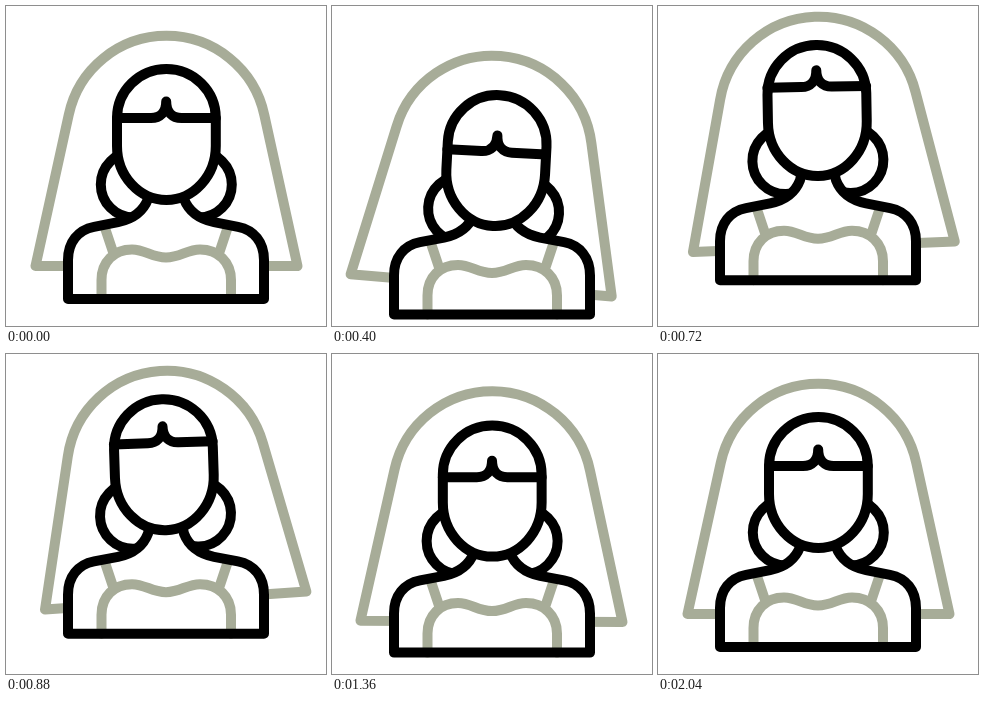
An HTML page with a canvas for the animation above (2300 ms loop, 320 by 320 pixels).

```html
<!DOCTYPE html>
<html lang="en">
<head>
<meta charset="utf-8">
<title>Bride</title>
<style>
html, body { margin: 0; width: 100%; height: 100%; overflow: hidden; background: #fff; }
canvas { display: block; width: 100vw; height: 100vh; }
</style>
</head>
<body>
<canvas id="stage"></canvas>
<script>
const SIZE = 320, LOOP = 2300, STEP = 40, END = 2040, MID = 160.3;
const INK = '#000', SAGE = '#a7ac98';
const canvas = document.getElementById('stage');
const ctx = canvas.getContext('2d');
const scale = Math.max(1, window.devicePixelRatio || 1);
canvas.width = canvas.height = SIZE * scale;

// Swings from rest through the given peaks, one per beat, with sine easing.
function swing(t, beats, peaks) {
  let from = 0, start = 0;
  for (let i = 0; i < beats.length; i++) {
    const to = peaks[i] || 0;
    if (t < beats[i]) {
      const u = Math.max(0, t - start) / (beats[i] - start);
      return from + (to - from) * (1 - Math.cos(Math.PI * u)) / 2;
    }
    from = to;
    start = beats[i];
  }
  return from;
}

const BOUNCE = [378, 755, 1168, 1590];
const TILT = [400, 850, 1250, 1780, END];
const SWAY = [880, 1110, 1500];
const bounce = (t, ...peaks) => swing(t, BOUNCE, peaks);
const tilt = (t, ...peaks) => swing(t, TILT, peaks);

const veil = new Path2D('M29.5 260L62.7 109A100 100 0 0 1 258.3 109L291.5 260Z');
const torso = new Path2D('M144 184L142 193C137 206 127 213 112 216.2L88 220.8C72 224 62 236 62 254V293H258V254C258 236 248 224 232 220.8L208 216.2C193 213 183 206 178 193L176 184');
const dress = new Path2D('M95.5 293V274C95.5 256 108 243.5 126 243.5C139 243.5 146 251.5 160 251.5C174 251.5 181 243.5 194 243.5C212 243.5 225 256 225 274V293M99 222L107 246M221.5 222L213.5 246');
const face = new Path2D('M111 112A49.4 49 0 0 1 209.8 112V140A49.4 54 0 0 1 111 140Z');
const fringe = new Path2D('M111 112H145C154 112 160.2 106 160.2 95.5C160.2 106 166.5 112 175.5 112H209.8');
const buns = new Path2D();
for (const side of [-1, 1]) {
  const x = MID + side * 32.5;
  buns.moveTo(x + 33, 178.5);
  buns.arc(x, 178.5, 33, 0, 2 * Math.PI);
}

function line(path, color) {
  ctx.strokeStyle = color;
  ctx.stroke(path);
}

function mask(path) {
  ctx.fillStyle = '#fff';
  ctx.fill(path);
}

function posed(dx, dy, turn, pivotY, paint) {
  ctx.save();
  ctx.translate(MID + dx, pivotY + dy);
  ctx.rotate(turn * Math.PI / 180);
  ctx.translate(-MID, -pivotY);
  paint();
  ctx.restore();
}

function draw(t) {
  ctx.setTransform(scale, 0, 0, scale, 0, 0);
  ctx.fillStyle = '#fff';
  ctx.fillRect(0, 0, SIZE, SIZE);
  ctx.lineWidth = 10;
  ctx.lineCap = ctx.lineJoin = 'round';

  const sway = swing(t, SWAY, [0, -1.2]);
  const headY = bounce(t - 6, 26.2, -25.5, 14.5);
  const headTurn = tilt(t, 3, -1.9);
  const inHead = paint => posed(sway * 0.5, headY, headTurn, 203, paint);

  posed(sway, bounce(t, 20.2, -20, 12.8), tilt(t, 4.85, -4, 0.4, -0.7), 126, () => line(veil, SAGE));
  inHead(() => line(buns, INK));
  posed(0, bounce(t, 15.7, -19.5, 9.8), 0, 0, () => {
    mask(torso);
    line(dress, SAGE);
    line(torso, INK);
  });
  inHead(() => {
    mask(face);
    line(face, INK);
    // The fringe slides further than the head it sits on.
    ctx.translate(0, headY * 0.3);
    line(fringe, INK);
  });
}

const start = performance.now();
function tick() {
  const t = (performance.now() - start) % LOOP;
  draw(Math.min(END, Math.floor(t / STEP) * STEP));
  requestAnimationFrame(tick);
}
tick();
</script>
</body>
</html>
```
